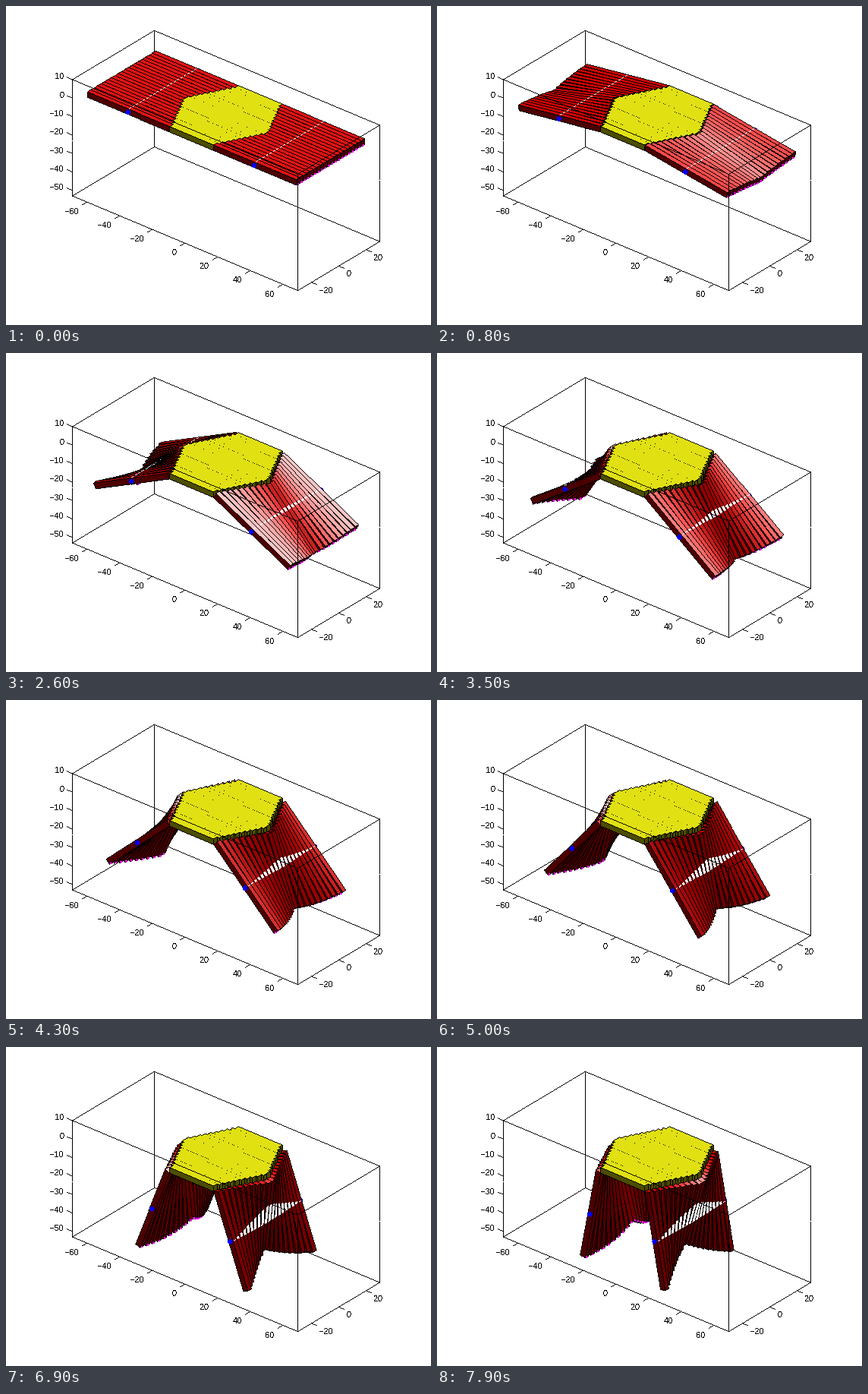
Animation of 560x420 px, one loop 8000 ms. Source, as a matplotlib script:

```python
import numpy as np
import matplotlib.pyplot as plt
from matplotlib.animation import FuncAnimation

W, H, DPI = 560, 420, 100
FRAMES, INTERVAL = 80, 100

# Folding table: 20 strips, hexagonal top, legs on a common bar
HALF_LEN, HALF_WID, THICK, STRIP = 64, 25, 3, 2.5
XL, YL, ZL = (-69, 69), (-30, 30), (-53, 10)

AZ, EL, SCALE = np.radians(40), np.radians(30), 2.808
VIEW = np.array([np.cos(EL) * np.sin(AZ), -np.cos(EL) * np.cos(AZ), np.sin(EL)])
LIGHT = np.array([0, 0.54, 0.84])
RED, YELLOW = np.array([1.0, 0, 0]), np.array([1.0, 1.0, 0])
BLACK, WHITE, BLUE, MAGENTA = (0, 0, 0), (1, 1, 1), (0, 0, 1), (1, 0, 1)


def project(x, y, z):
    px = 289.5 + SCALE * (np.cos(AZ) * x + np.sin(AZ) * y)
    depth = np.sin(AZ) * x - np.cos(AZ) * y
    py = 203 + SCALE * (np.sin(EL) * depth - np.cos(EL) * (z + 21.5))
    return px, py


def shade(base, n):
    nl = max(0.0, n @ LIGHT)
    rv = max(0.0, (2 * nl * n - LIGHT) @ VIEW) if nl > 0 else 0.0
    return np.minimum(1, base * (0.3 + 0.6 * nl) + 0.9 * rv ** 10)


class Canvas:
    """Hard-edged painter: convex fills and one-pixel lines, back to front."""

    def __init__(self, img=None):
        self.img = np.full((H, W, 3), 255, np.uint8) if img is None else img.copy()

    def line(self, a, b, color=BLACK):
        n = int(max(abs(b[0] - a[0]), abs(b[1] - a[1])) + 0.5)
        t = np.arange(n + 1) / max(n, 1)
        x = np.floor(a[0] + (b[0] - a[0]) * t + 0.5).astype(int)
        y = np.floor(a[1] + (b[1] - a[1]) * t + 0.5).astype(int)
        self.img[y, x] = np.round(np.multiply(color, 255))

    def fill(self, pts, color):
        p = np.array(pts)
        x0, y0 = np.floor(p.min(axis=0)).astype(int)
        x1, y1 = np.ceil(p.max(axis=0)).astype(int) + 1
        x, y = np.arange(x0, x1), np.arange(y0, y1)[:, None]
        q = np.roll(p, -1, axis=0)
        area = np.sum(p[:, 0] * q[:, 1] - p[:, 1] * q[:, 0])
        if abs(area) < 1e-6:
            return
        inside = np.ones((y1 - y0, x1 - x0), bool)
        for (ax_, ay), (bx, by) in zip(p, q):
            inside &= ((bx - ax_) * (y - ay) - (by - ay) * (x - ax_)) * area >= 0
        self.img[y0:y1, x0:x1][inside] = np.round(np.multiply(color, 255))

    def face(self, pts, color, edge=BLACK):
        p = [project(*v) for v in pts]
        self.fill(p, color)
        for a, b in zip(p, p[1:] + p[:1]):
            self.line(a, b, edge)

    def segment(self, a, b):
        self.line(project(*a), project(*b))

    def dot(self, p, r, color):
        x, y = project(*p)
        t = np.linspace(0, 2 * np.pi, 13)[:-1]
        self.fill(np.column_stack([x + r * np.cos(t), y + r * np.sin(t)]), color)

    def prism(self, prof, y0, y1, base, plain=()):
        """Extrude an xz profile along y, drawing only the visible sides."""
        for i, n in visible_sides(prof):
            a, b = prof[i], prof[(i + 1) % len(prof)]
            color = shade(base, n)
            quad = [(a[0], y0, a[1]), (b[0], y0, b[1]), (b[0], y1, b[1]), (a[0], y1, a[1])]
            self.face(quad, color, color if i in plain else BLACK)
        self.face([(x, y0, z) for x, z in prof], shade(base, np.array([0, -1.0, 0])))


def visible_sides(prof):
    prof = np.array(prof)
    mid, sides = prof.mean(axis=0), []
    for i, (a, b) in enumerate(zip(prof, np.roll(prof, -1, axis=0))):
        n = np.array([b[1] - a[1], 0, a[0] - b[0]])
        n /= np.linalg.norm(n)
        if n[[0, 2]] @ ((a + b) / 2 - mid) < 0:
            n = -n
        if n @ VIEW > 1e-6:
            sides.append((i, n))
    return sides


def half_top(k):
    return 25 - 1.28 * k


W0 = half_top(9)
BAR = (HALF_LEN - W0) / 2


def draw_leg(cv, side, w, y0, phi, slide):
    c, sn = np.cos(phi), np.sin(phi)
    length, y1 = HALF_LEN - w, y0 + STRIP

    def at(u, v):
        return side * (w + u * c + v * sn), -u * sn + v * c

    prof = [at(0, 0), at(length, 0), at(length, THICK), at(0, THICK)]
    seen = [i for i, _ in visible_sides(prof)]
    foot = (prof[1][0], y0 + STRIP / 2, prof[1][1])
    foot_seen = 0 in seen or 1 in seen
    if not foot_seen:
        cv.dot(foot, 1.4, MAGENTA)
    cv.prism(prof, y0, y1, RED)
    if 2 in seen:
        (xa, za), (xb, zb) = at(W0 + BAR - w, THICK), at(slide, THICK)
        ya, yb = y0 + 0.7, y1 - 0.7
        cv.face([(xa, ya, za), (xb, ya, zb), (xb, yb, zb), (xa, yb, za)], WHITE, WHITE)
    if foot_seen:
        cv.dot(foot, 1.4, MAGENTA)


def draw_top(cv, w, k, y0):
    y1 = y0 + STRIP
    cv.prism([(-w, 0), (w, 0), (w, THICK), (-w, THICK)], y0, y1, YELLOW, plain=(2,))
    for side in (-1, 1):
        cv.segment((side * w, y0, THICK), (side * w, y1, THICK))
        if y0 >= 0:
            inner = half_top(k + 1) if k < 9 else -w
            cv.segment((side * w, y1, THICK), (side * inner, y1, THICK))


def draw_table(cv, theta):
    h = THICK / 2
    bx = W0 + BAR * np.cos(theta) + h * np.sin(theta)
    bz = -BAR * np.sin(theta) + h * np.cos(theta)

    def bar_ends(y):
        for side in (-1, 1):
            cv.dot((side * bx, y, bz), 3.3, BLUE)

    bar_ends(HALF_WID + 0.5)
    for j in range(19, -1, -1):
        y0 = -HALF_WID + STRIP * j
        k = j - 10 if j >= 10 else 9 - j
        w = half_top(k)
        dx = bx - w
        slide = np.sqrt(dx * dx + bz * bz - h * h)
        phi = np.arctan2(-bz, dx) + np.arctan2(h, slide)
        tucked = phi > np.pi / 2
        draw_leg(cv, -1, w, y0, phi, slide)
        if tucked:
            draw_leg(cv, 1, w, y0, phi, slide)
        draw_top(cv, w, k, y0)
        if not tucked:
            draw_leg(cv, 1, w, y0, phi, slide)
    bar_ends(-HALF_WID - 0.5)


def draw_box(cv, front):
    """Box edges: the three at the nearest corner lie in front of the table."""
    near = (XL[1], YL[0], ZL[1])
    corners = [(x, y, z) for x in XL for y in YL for z in ZL]
    for i, a in enumerate(corners):
        for b in corners[i + 1:]:
            if sum(p != q for p, q in zip(a, b)) == 1 and (near in (a, b)) == front:
                cv.segment(a, b)


fig = plt.figure(figsize=(W / DPI, H / DPI), dpi=DPI, facecolor="white")
ax = fig.add_axes([0, 0, 1, 1])
ax.axis("off")


def label(x, y, v, ha):
    ax.text(x, y, str(v).replace("-", "\u2212"), ha=ha, va="center_baseline",
            family="Liberation Sans", fontsize=11 * 72 / DPI, antialiased=False)


def draw_ticks(cv):
    for v in range(-60, 61, 20):
        x, y = project(v, YL[0], ZL[0])
        cv.line((x, y), (x - 6, y + 3.6))
        label(x - 11, y + 12, v, "right")
    for v in (-20, 0, 20):
        x, y = project(XL[1], v, ZL[0])
        cv.line((x, y), (x + 7, y + 2.9))
        label(x + 10, y + 10, v, "left")
    for v in range(-50, 11, 10):
        x, y = project(XL[0], YL[0], v)
        cv.line((x, y), (x - 7, y - 2.9))
        label(x - 11, y - 4.5, v, "right")


back = Canvas()
draw_box(back, front=False)
draw_ticks(back)
stage = ax.imshow(back.img, interpolation="nearest", aspect="auto",
                  extent=(-0.5, W - 0.5, H - 0.5, -0.5))


def update(i):
    cv = Canvas(back.img)
    draw_table(cv, np.radians(i))      # one degree per frame
    draw_box(cv, front=True)
    stage.set_data(cv.img)
    return [stage]


anim = FuncAnimation(fig, update, frames=FRAMES, interval=INTERVAL, repeat=True,
                     repeat_delay=0, blit=False)
plt.show()
```
